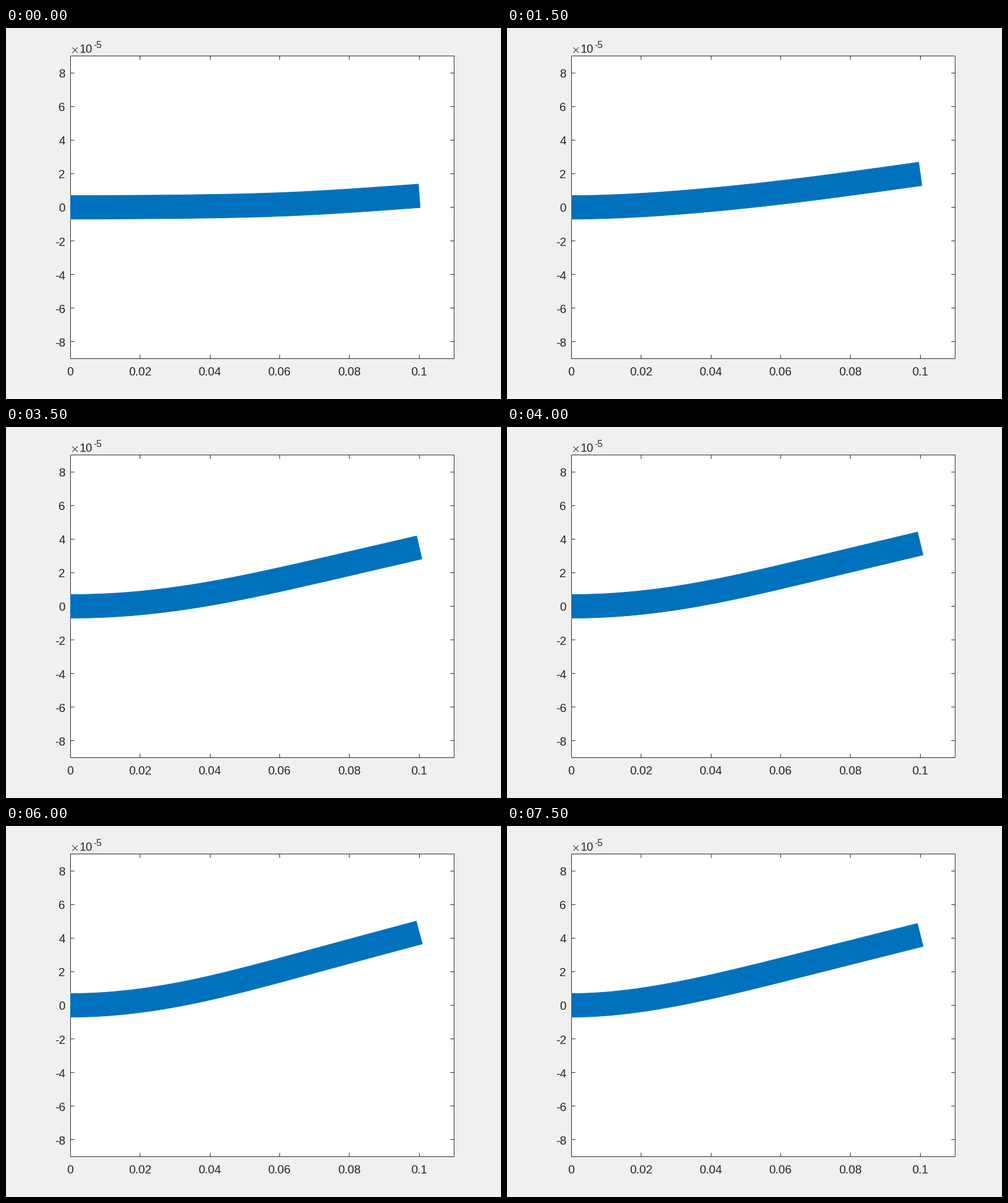
A matplotlib script for the animation above (8 s loop, 840 by 630 pixels).

```python
import numpy as np
import matplotlib.pyplot as plt
from matplotlib.animation import FuncAnimation
from matplotlib.patches import Polygon, Rectangle

W, H, DPI = 840, 630, 100
PX = 72 / DPI                              # points per pixel
LEFT, RIGHT, TOP, BOTTOM = 109, 760, 47, 561
MID = (TOP + BOTTOM) / 2
UNIT_X = (RIGHT - LEFT) / 11               # pixels per 0.01
UNIT_Y = (BOTTOM - TOP) / 18               # pixels per 1e-5
HALF = 20                                  # half thickness of the beam
TICK = 6.5
INK, BLUE = "#262626", "#0072BD"
FRAMES, STEP = 16, 500

S = np.linspace(0, 1, 121)                 # position along the beam


def mode(b):
    """Cantilever mode shape scaled to 1 at the tip."""
    k = (np.cosh(b) + np.cos(b)) / (np.sinh(b) + np.sin(b))
    z = b * S
    y = np.cosh(z) - np.cos(z) - k * (np.sinh(z) - np.sin(z))
    return y / y[-1]


MODES = [mode(b) for b in (1.8751, 4.6941, 7.8548)]


def deflection(t):
    """Upward deflection in pixels after t seconds, as a sum of modes."""
    swing = 127 * np.sin(0.222 * (t + 0.55))
    ripple = 2.4 - 0.8 * t + 1.6 * np.cos(2 * np.pi * (t - 3.5) / 3)
    flutter = -0.15 + 0.95 * np.cos(2 * np.pi * (t - 0.3) / 9.5)
    return swing * MODES[0] + ripple * MODES[1] + flutter * MODES[2]


def outline(t):
    x = LEFT + 10 * UNIT_X * S
    y = MID - deflection(t)
    slope = np.gradient(y, x)
    slope[0] = 0
    normal = HALF * np.column_stack([slope, -np.ones_like(slope)])
    normal /= np.hypot(1, slope)[:, None]
    mid = np.column_stack([x, y])
    return np.vstack([mid + normal, (mid - normal)[::-1]])


# Whole numbers are pixel centres
fig = plt.figure(figsize=(W / DPI, H / DPI), dpi=DPI, facecolor="#F0F0F0")
ax = fig.add_axes([0, 0, 1, 1])
ax.set_xlim(-0.5, W - 0.5)
ax.set_ylim(H - 0.5, -0.5)
ax.axis("off")


def line(x0, y0, x1, y1):
    ax.plot([x0, x1], [y0, y1], color=INK, lw=PX, zorder=2,
            solid_capstyle="butt", snap=False)


def label(x, y, text, ha="left", size=20):
    ax.text(x, y, text, ha=ha, va="baseline", color=INK,
            family="Liberation Sans", size=size * PX)


ax.add_patch(Rectangle((LEFT, TOP), RIGHT - LEFT, BOTTOM - TOP, fc="white",
                       ec=INK, lw=PX, zorder=1, snap=False))

for k in range(0, 11, 2):
    x = LEFT + k * UNIT_X
    if k:
        col = round(x)
        line(col, TOP, col, TOP + TICK)
        line(col, BOTTOM, col, BOTTOM - TICK)
    label(x - 0.5, 590, f"{k / 100:g}", "center")

for k in range(-8, 9, 2):
    y = MID - k * UNIT_Y
    row = round(y)
    line(LEFT, row, LEFT + TICK, row)
    line(RIGHT, row, RIGHT - TICK, row)
    label(100, y + 8, str(k), "right")

# Axis multiplier
line(112, 32.5, 121, 41.5)
line(112, 41.5, 121, 32.5)
label(124, 42, "10")
label(147.5, 33, "-5", size=16)

beam = ax.add_patch(Polygon(outline(0), closed=True, fc=BLUE, ec=BLUE,
                            lw=PX, joinstyle="miter", zorder=3, snap=False))


def update(i):
    beam.set_xy(outline(i * STEP / 1000))
    return (beam,)


anim = FuncAnimation(fig, update, frames=FRAMES, interval=STEP,
                     repeat=True, repeat_delay=0, blit=False)
plt.show()
```
